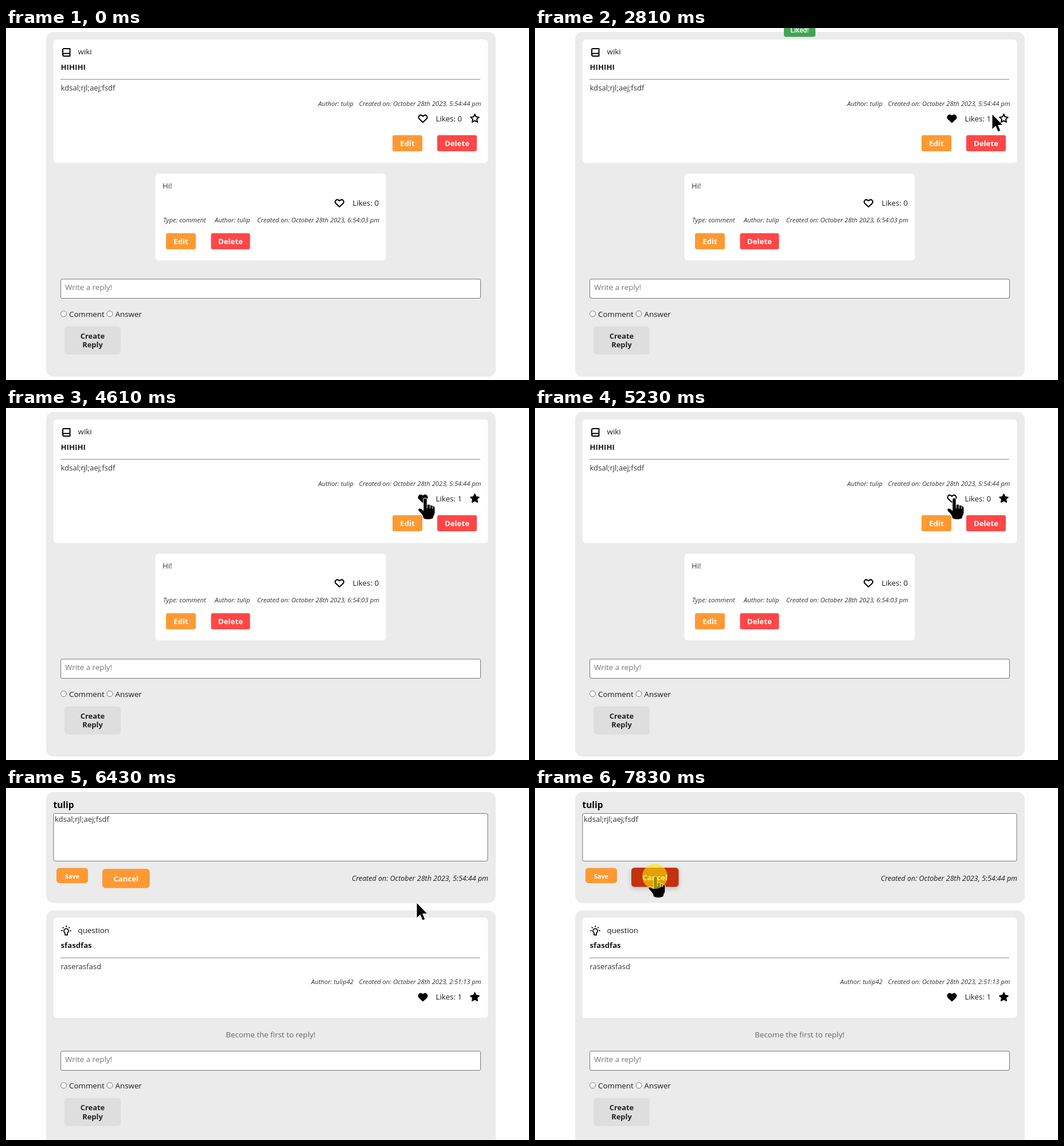
Write an HTML page that moves like this. It is 912 by 614 pixels and loops after 8000 ms.

```html
<!DOCTYPE html>
<html lang="en">
<head>
<meta charset="utf-8">
<title>Post page</title>
<style>
  html, body { margin: 0; width: 100%; height: 100%; overflow: hidden; background: #fefefe; }
  svg { display: block; }
  text { font: 13.35px "Open Sans", "Noto Sans", sans-serif; fill: #1c1c1c; white-space: pre; }
  .bold { font-weight: 700; font-size: 13.2px; }
  .body { font-size: 13.1px; fill: #333; }
  .meta { font-style: italic; font-size: 11.2px; fill: #333; }
  .date { font-style: italic; font-size: 12.5px; }
  .title { font-weight: 700; font-size: 15.4px; fill: #000; }
  .hint { fill: #757575; }
  .btn { font-weight: 700; font-size: 13.2px; fill: #fff; text-anchor: middle; }
  .small { font-size: 10.8px; }
  .dark { fill: #222; font-size: 12.9px; }
  .toast { font: 500 12px Roboto, sans-serif; fill: #fff; text-anchor: middle; }
  .end { text-anchor: end; }
  .mid { text-anchor: middle; fill: #666; }
  .icon { stroke: #000; stroke-width: 2; stroke-linejoin: round; stroke-linecap: round; }
  .raised { filter: drop-shadow(0 3px 4px rgba(0, 0, 0, .2)); }
</style>
</head>
<body>
<svg id="stage" width="912" height="614" viewBox="0 0 912 614"></svg>
<script>
const LOOP = 8000;
const ORANGE = '#ff9933', RED = '#ff4747', HOVER = '#c2320f';

// Pointer poses: start time, shape, hot spot
const poses = [
  [0], [990, 'arrow', 895, 372], [1190, 'arrow', 791, 238], [1390, 'arrow', 743, 162],
  [1590, 'arrow', 732.5, 147], [1790, 'arrow', 731.5, 150], [1990, 'hand', 730, 151],
  [2410, 'hand', 732, 153], [2810, 'arrow', 797, 150], [3010, 'hand', 808.5, 157],
  [4210, 'beam', 779.5, 158], [4410, 'hand', 736, 157], [4610, 'hand', 731, 157],
  [5830, 'hand', 716, 197], [6030, 'hand', 715, 198], [6430, 'arrow', 716, 200],
  [7230, 'arrow', 640, 199], [7430, 'arrow', 378, 199], [7630, 'arrow', 242, 163],
  [7830, 'hand', 210, 154]
];
// Toasts: start, end, left, right, message
const toasts = [
  [2410, 3810, 434, 489, 'Liked!'],
  [3810, 4010, 400.5, 522.5, 'Added to favorites!'],
  [5030, 5230, 413, 510, 'Like removed!']
];
const times = [...new Set([...poses.map(p => p[0]), ...toasts.flatMap(t => [t[0], t[1]])])]
  .sort((a, b) => a - b);

const text = (x, y, s, cls = '') => `<text x="${x}" y="${y}" class="${cls}">${s}</text>`;
const box = (x, y, right, bottom, r, fill, more = '') =>
  `<rect x="${x}" y="${y}" width="${right - x}" height="${bottom - y}" rx="${r}" fill="${fill}" ${more}/>`;
const at = (x, y, inner) => `<g transform="translate(${x} ${y})">${inner}</g>`;
const panel = (top, bottom) => box(70, top, 854, bottom, 13, '#ebebeb');
const field = (x, y, right, bottom) =>
  box(x + .5, y + .5, right - .5, bottom - .5, 2.5, '#fff', 'stroke="#767676"');

function button(x, y, w, h, label, fill, r = 3, cls = '') {
  return box(x, y, x + w, y + h, r, fill, fill === HOVER ? 'class="raised"' : '') +
    text(x + w / 2, y + h / 2 + 5, label, 'btn ' + cls);
}

const heart = (x, y, on) => at(x, y,
  `<path class="icon" fill="${on ? '#000' : 'none'}" d="M0 6.5L-6.3 .6C-10-3.5-4.5-9 0-4C4.5-9 10-3.5 6.3 .6Z"/>`);

function star(x, y, on) {
  const points = Array.from({ length: 10 }, (_, i) => {
    const a = i * Math.PI / 5, r = i % 2 ? 3.7 : 7.7;
    return `${(r * Math.sin(a)).toFixed(2)},${(-r * Math.cos(a)).toFixed(2)}`;
  });
  return at(x, y, `<polygon class="icon" fill="${on ? '#000' : 'none'}" points="${points.join(' ')}"/>`);
}

const book = '<path class="icon" fill="none" d="M111.5 49H101.5a2.5 2.5 0 0 1-2.5-2.5V38a2 2 0 0 1 2-2h10.5ZM99 46.5a2.5 2.5 0 0 1 2.5-2H111.5"/>';

function bulb() {
  const rays = [-90, -45, 0, 180, 225].map(deg =>
    `<path d="M6.8 0H8" transform="rotate(${deg})"/>`).join('');
  return at(105, 42, `<g class="icon" fill="none" style="stroke-width:1.7">
    <path d="M-2 7.5V4A4 4 0 1 1 2 4V7.5Z"/>${rays}</g>`);
}

// Top part of a post card
function post(icon, kind, title, body, author, created, likes, liked, starred) {
  return icon + text(125.5, 46.3, kind) + text(95.5, 72.5, title, 'bold') +
    box(95, 89, 827, 90, 0, '#8c8c8c') + text(95.5, 109, body, 'body') +
    text(606, 135.5, 'Author: ' + author, 'meta end') +
    text(828.5, 135.5, 'Created on: ' + created, 'meta end') +
    heart(727, 158, liked) + text(749.5, 162.7, 'Likes: ' + likes) + star(817.5, 158, starred);
}

function replyForm(y) {
  const radio = x => `<circle cx="${x}" cy="${y + 60}" r="5" fill="#fff" stroke="#767676"/>`;
  return radio(100.5) + text(110, y + 65.5, 'Comment') + radio(181) + text(190.5, y + 65.5, 'Answer') +
    box(102, y + 82, 200, y + 131, 6, '#dedede') +
    text(151, y + 103, 'Create', 'btn dark') + text(151, y + 118.7, 'Reply', 'btn dark');
}

const replyField = y => field(95, y, 828, y + 34.5) + text(103, y + 19, 'Write a reply!', 'hint');

function viewPage(t) {
  const liked = t >= 2410 && t < 5030;
  const lift = t >= 6030 ? 2 : t >= 5830 ? 1 : 0;
  const editFill = [ORANGE, '#e06620', HOVER][lift];
  return panel(7, 608) + box(82.5, 20, 840.5, 235.5, 6, '#fff') +
    post(book, 'wiki', 'HIHIHI', 'kdsal;rjl;aej;fsdf', 'tulip',
      'October 28th 2023, 5:54:44 pm', +liked, liked, t >= 3810) +
    button(674, 187 - lift, 52, 28, 'Edit', editFill) + button(752, 187, 69, 28, 'Delete', RED) +
    box(260.5, 254, 662.5, 405.5, 6, '#fff') + text(273, 280, 'Hi!', 'body') +
    heart(581.5, 305.5, false) + text(604.5, 310, 'Likes: 0') +
    text(274, 339, 'Type: comment', 'meta') + text(425.5, 339, 'Author: tulip', 'meta end') +
    text(651, 339, 'Created on: October 28th 2023, 6:54:03 pm', 'meta end') +
    button(279, 358, 52, 28, 'Edit', ORANGE) + button(357.5, 358, 68, 28, 'Delete', RED) +
    replyField(437.5) + replyForm(438.5);
}

function editPage(t) {
  const hover = t >= 7830;
  return panel(7, 200.5) + text(82.5, 34.5, 'tulip', 'title') + field(82.5, 44, 840.5, 128) +
    text(85, 59, 'kdsal;rjl;aej;fsdf', 'body') +
    button(88, 139.5, 55, 26.5, 'Save', ORANGE, 5, 'small') +
    button(168, hover ? 139 : 141, 82.5, 33.5, 'Cancel', hover ? HOVER : ORANGE, 5.5) +
    text(841, 161.5, 'Created on: October 28th 2023, 5:54:44 pm', 'date end') +
    panel(213.5, 640) + box(82.5, 226, 840.5, 401, 6, '#fff') +
    at(0, 206.8, post(bulb(), 'question', 'sfasdfas', 'raserasfasd', 'tulip42',
      'October 28th 2023, 2:51:13 pm', 1, true, true)) +
    text(461.5, 435, 'Become the first to reply!', 'mid') +
    replyField(458.5) + replyForm(458.8);
}

const shapes = {
  arrow: '<path stroke="#fff" d="M0 0V27L6.2 21.3 10.3 31 14.8 29 10.7 19.5H19Z"/>',
  beam: '<path fill="none" stroke="#000" stroke-width="2" d="M-7-16H-2L0-14 2-16H7M0-14V14M-7 16H-2L0 14 2 16H7"/>',
  hand: `<path stroke="#fff" d="M-3.2 3a3.2 3.2 0 0 1 6.4 0V11.5q5-1.5 5.5 1q4.3-1 4.8 1.5q3.5-.5 3.5 3V26q0 3-2.5 6V34Q13 37.5 5 37.5T-4 34V32C-6 28-9 25-12 22q-1-4 2.5-4q3 0 6.3 4Z"/>
    <path fill="none" stroke="#fff" d="M3.3 11.5V18M8.4 13V18.5M12.8 14.5V19"/>`
};

function scene(t) {
  const [, shape, x, y] = poses.filter(p => p[0] <= t).pop();
  let out = t < 6430 ? viewPage(t) : editPage(t);
  for (const [from, to, left, right, message] of toasts)
    if (t >= from && t < to)
      out += box(left, -12, right, 15.5, 4, '#43a257') + text((left + right) / 2, 7.5, message, 'toast');
  if (shape) out += at(x, y, shapes[shape]);
  if (t >= 7830) out += '<circle cx="209" cy="154" r="22" fill="#ffe600" fill-opacity=".6"/>';
  return out;
}

const stage = document.getElementById('stage');
let shown = -1;
function frame() {
  const t = performance.now() % LOOP;
  const step = times.filter(s => s <= t).pop();
  if (step !== shown) stage.innerHTML = scene(shown = step);
  requestAnimationFrame(frame);
}
frame();
</script>
</body>
</html>
```
